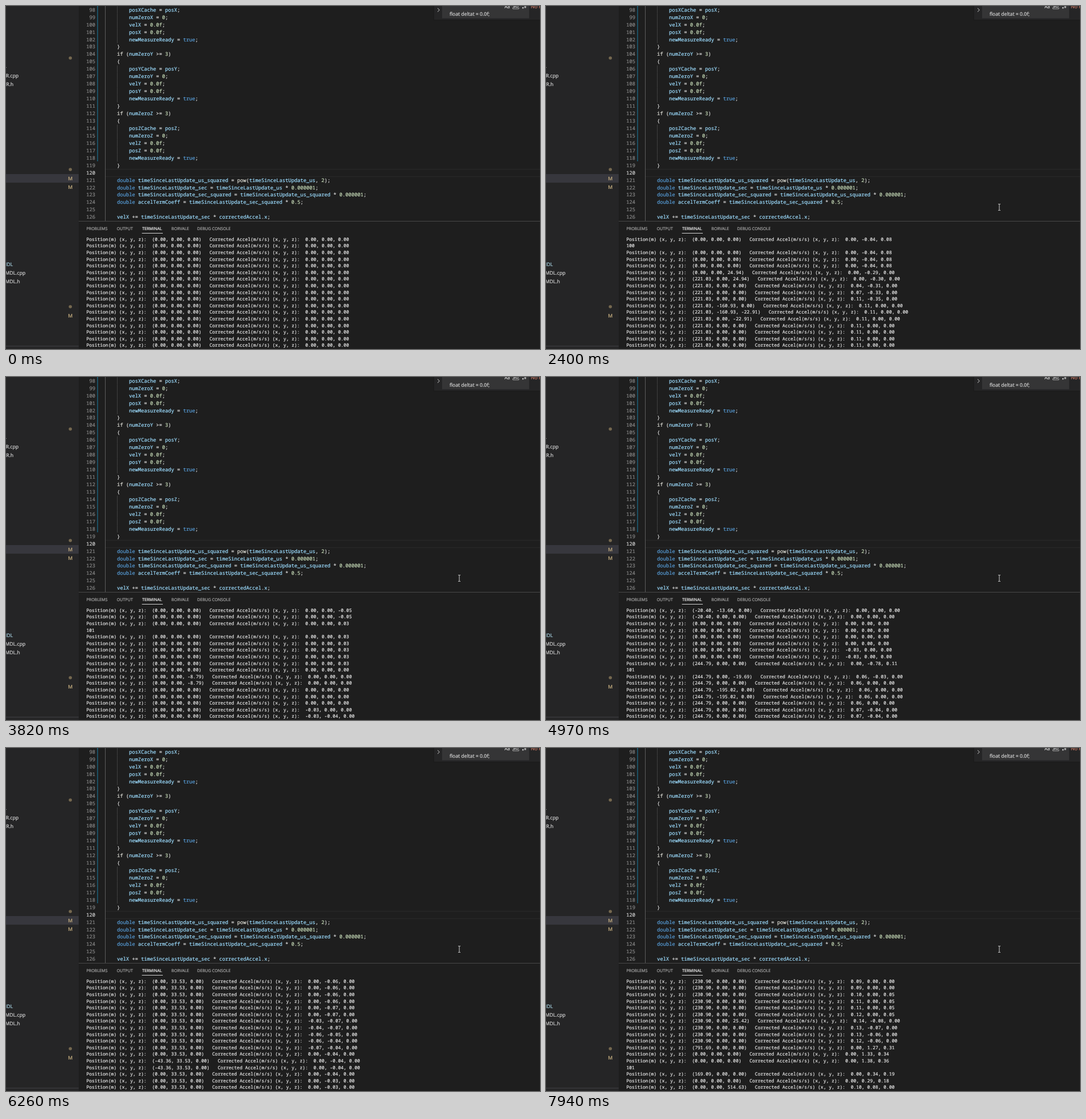
These frames come from a looping animation (933 px wide and 600 px high, 8000 ms). An HTML page:

```html
<!DOCTYPE html>
<html lang="en">
<head>
<meta charset="utf-8">
<title>Editor with sensor log</title>
<style>
  html, body { margin: 0; width: 100%; height: 100%; overflow: hidden; background: #1e1e1e; }
  svg { display: block; width: 933px; height: 600px; }
  text {
    white-space: pre; text-rendering: geometricPrecision;
    fill: currentColor; stroke: currentColor; stroke-width: 0.22px;
  }
  .code { font: 8.76px "Noto Sans Mono", monospace; color: #d8d8d8; }
  .log { font: 7.975px "Noto Sans Mono", monospace; color: #e4e4e4; }
  .ui { font: 8.6px "Open Sans", sans-serif; color: #d4d4d4; }
  .tab { font: 7.15px "Open Sans", sans-serif; color: #a4a4a4; }
</style>
</head>
<body>
<svg id="stage" viewBox="0 0 933 600"></svg>
<script>
const stage = document.getElementById('stage');

function add(tag, attrs, parent = stage) {
  const el = document.createElementNS('http://www.w3.org/2000/svg', tag);
  for (const key in attrs) el.setAttribute(key, attrs[key]);
  parent.appendChild(el);
  return el;
}
const rect = (x, y, width, height, fill) => add('rect', { x, y, width, height, fill });
function text(cls, x, y, str, attrs = {}) {
  const el = add('text', { class: cls, x, y, ...attrs });
  el.textContent = str;
  return el;
}

// Sidebar
rect(0, 0, 127, 600, '#252526');
rect(0, 294, 127, 15, '#37373d');
rect(0, 594.5, 127, 1, '#444446');
rect(0, 107, 1, 1, '#8a8a8a');
const files = [['R.cpp', 22, 124.6], ['R.h', 13, 139.6], ['MDL', 12, 454.6, '#a9d6e6'],
  ['MDL.cpp', 34, 469.6], ['MDL.h', 24.5, 484.6]];
for (const [name, x, y, color = '#d4d4d4'] of files)
  text('ui', x, y, name, { 'text-anchor': 'end', style: `color:${color}` });
for (const cy of [91, 286, 526]) add('circle', { cx: 112.4, cy, r: 2.8, fill: '#75684f' });
for (const y of [305, 320, 545])
  text('ui', 112.4, y, 'M', { 'text-anchor': 'middle', style: 'color:#d0b786' });

// Editor
const ROW = 12.95, CHAR = 5.256, FIRST = 98;
const block = a => [`pos${a}Cache = pos${a};`, `numZero${a} = 0;`, `vel${a} = 0.0f;`,
  `pos${a} = 0.0f;`, 'newMeasureReady = true;'].map(s => '    ' + s).concat('}');
const test = a => [`if (numZero${a} >= 3)`, '{', ...block(a)];
const code = [...block('X'), ...test('Y'), ...test('Z'), '',
  'double timeSinceLastUpdate_us_squared = pow(timeSinceLastUpdate_us, 2);',
  'double timeSinceLastUpdate_sec = timeSinceLastUpdate_us * 0.000001;',
  'double timeSinceLastUpdate_sec_squared = timeSinceLastUpdate_us_squared * 0.000001;',
  'double accelTermCoeff = timeSinceLastUpdate_sec_squared * 0.5;', '',
  'velX += timeSinceLastUpdate_sec * correctedAccel.x;'];
const TOKEN = /\b(double|true)\b|\b(if|pow)\b|\b(\d[\d.]*f?)|([A-Za-z_]\w*)|[^\w]+/g;
const COLORS = ['#569cd6', '#dcdcd4', '#c4d8b6', '#9cdcfe'];

function codeLine(x, y, str) {
  const line = text('code', x, y, '');
  for (const m of str.matchAll(TOKEN)) {
    const kind = m.slice(1).findIndex(Boolean);
    add('tspan', { color: COLORS[kind] || '#d8d8d8' }, line).textContent = m[0];
  }
}

rect(174, 285.2, 759, 1, '#2b2b2b');
rect(174, 297.8, 759, 1, '#2b2b2b');
rect(173, 0, 1, 376, '#5c5c5c');
add('path', { d: 'M160 0V272', stroke: '#1b81a8', 'stroke-width': 1.6, 'stroke-dasharray': '1.3 0.7' });
code.forEach((str, i) => {
  const n = FIRST + i, y = 9.7 + i * ROW;
  if (str[0] === ' ') rect(194, i * ROW + 0.3, 1, ROW, '#404040');
  text('code', 156, y, n, { 'text-anchor': 'end', style: `color:${n === 120 ? '#d0d0d0' : '#858585'}` });
  const indent = str.length - str.trimStart().length;
  codeLine(194 + indent * CHAR, y, str.trimStart());
});

// Find box
rect(747, 0, 186, 25, '#1a1a1a');
rect(748, 0, 185, 24, '#252526');
rect(762, 0, 152, 21.5, '#353536');
add('path', { d: 'M754 3.8L757.4 7L754 10.2', fill: 'none', stroke: '#c5c5c5' });
text('ui', 775, 16.8, 'float deltat = 0.0f;');
text('ui', 871, 4, 'Aa', { style: 'font-size:8px' });
text('ui', 886, 3.4, 'ab', { style: 'font-size:8px' });
add('path', { d: 'M885.5 2.5V5H896V2.5', fill: 'none', stroke: '#c5c5c5', 'stroke-width': 0.8 });
rect(902, 2, 2.4, 2.4, '#c5c5c5');
text('ui', 905, 6, '*', { style: 'font-size:8px' });
text('ui', 917, 4.2, 'No results', { style: 'color:#c97a66' });

// Panel
rect(127, 376, 806, 1, '#474747');
const tabs = [['PROBLEMS', 140.5], ['OUTPUT', 193.5], ['TERMINAL', 238], ['BORVALE', 289], ['DEBUG CONSOLE', 334]];
for (const [name, x] of tabs)
  text('tab', x, 392, name, name === 'TERMINAL' ? { style: 'color:#f0f0f0' } : {});
rect(237.5, 397, 36.5, 1, '#d0d0d0');

const ROWS = 17;
const rows = Array.from({ length: ROWS }, (_, i) => text('log', 140.4, 410.9 + i * 11.594, ''));

// Log script: x y z set the position, a b c the acceleration,
// '.' repeats the line above, '#' prints the update rate.
const script = `#100 ................. b-.04,c.08 #100 ... z24.94,b-.29,c0 x221.03,b-.3
  z0,a.04,b-.31 a.07,b-.33 a.11,b-.35 y-160.93,b0 z-22.91 y0 z0 ... .. a.07 a.04
  #100 a0,c-.04 .. x0 ... c-.05 .......... c.03 #101 ..... c0 z-8.79 . z0 .. a-.03 b-.04
  x-20.4,a0 y-13.6,b0 y0 x0 ... a-.03 . x244.79,a0,b-.78,c.11
  #101 z-19.69,a.06,b-.03,c0 z0,b0 y-195.02 . y0 a.07,b-.04 . .. a.04
  y33.53,a0,b-.05 x0 ... b-.06 ... #101 .... b-.07 . a-.03 a-.04 a-.06,b-.05 b-.04 a-.07 a0
  x-43.36 . x0 b-.03 .. x230.9,b-.68,c.07
  #101 z169.96,a.17,b-.17,c0 z0,b-.15 b-.13 y-587.73,a.09,b0 y0 . a.1,c.05 a.11 . a.12
  z25.42,a.14,b-.08,c0 z0,a.13,b-.07 b-.06 a.12 x791.69,a0,b1.27,c.31 x0,b1.33,c.34 b1.38,c.36
  #101 x169.09,b.34,c.19 x0,b.29,c.18 z514.63,a.1,b.08,c0`;

function buildLog() {
  const v = { x: 0, y: 0, z: 0, a: 0, b: 0, c: 0 };
  const list = keys => [...keys].map(k => v[k].toFixed(2)).join(', ');
  const line = () => `Position(m) (x, y, z):  (${list('xyz')})   Corrected Accel(m/s/s) (x, y, z):  ${list('abc')}`;
  const out = Array(ROWS).fill(line());
  for (const word of script.split(/\s+/)) {
    if (word[0] === '#') out.push(word.slice(1));
    else if (/^\.+$/.test(word)) for (const _ of word) out.push(line());
    else {
      for (const part of word.split(',')) v[part[0]] = +part.slice(1);
      out.push(line());
    }
  }
  return out;
}
const log = buildLog();

// Output bursts: first step, last step, lines printed at each step
const bursts = [[590, 870, '34452'], [1600, 1660, '22'], [1990, 2060, '23'], [2260, 2680, '3233333'],
  [2940, 3010, '22'], [3400, 4030, '3333334222'], [4430, 4430, '1'], [4630, 4630, '1'],
  [4830, 5230, '3342222'], [5560, 6260, '22222222222'], [6590, 6660, '11'],
  [6860, 7270, '2222222'], [7530, 7940, '121211']];
const steps = bursts.flatMap(([from, to, counts]) => [...counts].map((n, i) =>
  [Math.floor(from + (to - from) * i / Math.max(1, counts.length - 1)), +n]));

// Mouse pointer
const pointer = add('path', { d: 'M-2 -5.5H-.6L0 -5L.6 -5.5H2M0 -5V5M-2 5.5H-.6L0 5L.6 5.5H2',
  fill: 'none', stroke: '#d0d0d0', 'stroke-width': 1 });
const moves = [[70, 866, 531], [130, 838, 455], [200, 803, 372], [260, 792, 352]];

const LOOP = 8000;
let shown = -1;
function draw(t) {
  const end = steps.reduce((sum, [at, n]) => at <= t ? sum + n : sum, ROWS);
  if (end !== shown) {
    shown = end;
    rows.forEach((row, i) => { row.textContent = log[end - ROWS + i]; });
  }
  const pos = moves.filter(m => m[0] <= t).pop();
  pointer.setAttribute('visibility', pos ? 'visible' : 'hidden');
  if (pos) pointer.setAttribute('transform', `translate(${pos[1]} ${pos[2]})`);
}

const start = performance.now();
function tick() {
  draw((performance.now() - start) % LOOP);
  requestAnimationFrame(tick);
}
tick();
</script>
</body>
</html>
```
